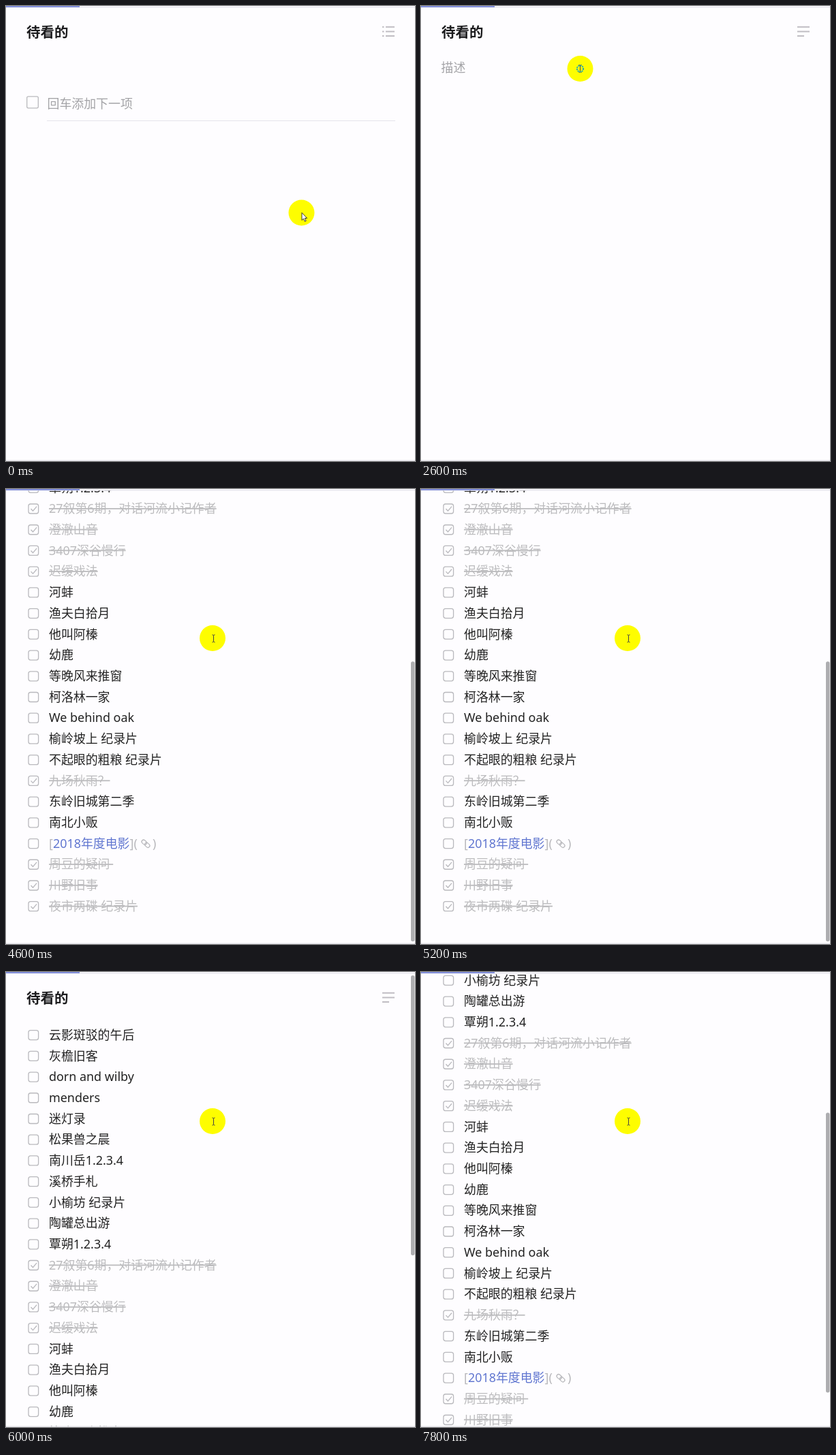
These frames come from a looping animation (600 px wide and 668 px high, 8 s). An HTML page:

```html
<!DOCTYPE html>
<html lang="zh-CN">
<head>
<meta charset="utf-8">
<style>
  html, body { margin: 0; width: 100%; height: 100%; overflow: hidden; background: #fefdff; }
  svg { display: block; font: 17.92px "Noto Sans", "Noto Sans CJK SC", "Noto Sans CJK", sans-serif; fill: #222; }
  .title { font-size: 20.48px; font-weight: bold; fill: #1c1c1e; }
  .hint { fill: #a3a3a6; }
  .done { fill: #bcbcbe; text-decoration: line-through; }
  .soft { fill: #b8b8bc; }
  .link { fill: #6076d0; }
  .box { fill: none; stroke: #b9b9bd; stroke-width: 1.3; }
  .icon { fill: none; stroke: #c0bdc3; stroke-width: 2; }
  .menu { font-size: 10.4px; fill: #111; }
  .menu .latin { font-size: 11.1px; }
  .menu .off { fill: #8c8c8c; }
  .halo { fill: #ff0; mix-blend-mode: multiply; }
  .pointer { fill: #fff; stroke: #222; stroke-width: .9; stroke-linejoin: round; }
  .beam { fill: none; stroke: #444; stroke-width: 1; }
</style>
</head>
<body>
<svg id="stage" width="600" height="668" viewBox="0 0 600 668"></svg>
<script>
const LOOP = 8000, STEP = 200, ROW = 30.72, MAX_SCROLL = 401.5;

// A leading "x" marks a finished item.
const items = `云影斑驳的午后|灰檐旧客|dorn and wilby|menders|迷灯录|松果兽之晨|南川岳1.2.3.4|溪桥手札
|小榆坊 纪录片|陶罐总出游|覃朔1.2.3.4|x27叙第6期，对话河流小记作者|x澄澈山音|x3407深谷慢行|x迟缓戏法|河蚌
|渔夫白拾月|他叫阿榛|幼鹿|等晚风来推窗|柯洛林一家|We behind oak|榆岭坡上 纪录片|不起眼的粗粮 纪录片
|x九场秋雨？|东岭旧城第二季|南北小贩|[2018年度电影]|x周豆的疑问\u00a0|x川野旧事|x夜市两碟 纪录片`.replace(/\n/g, '').split('|');

// label, shortcut (">" opens a submenu), icon shape and colour; "-" is a divider.
const menuRows = [
  ['表情符号', 'Win 键+期间'], '-',
  ['撤消(U)', 'Ctrl+Z'], ['重做(R)', 'Ctrl+Shift+Z', 'off'], '-',
  ['剪切(T)', 'Ctrl+X', 'off'], ['复制(C)', 'Ctrl+C', 'off'], ['粘贴(P)', 'Ctrl+V'],
  ['粘贴为纯文本', 'Ctrl+Shift+V'], ['全选(A)', 'Ctrl+A'], '-',
  ['拼写检查(S)', '>'], ['书写方向', '>'], '-',
  ['屏蔽元素...', '', 'square', '#8b1a20'], ['显示 7Keynooks', '', 'circle', '#3b83c8'],
  ['以 Email 发送页面链接...', '', 'square', '#e2483d'], ['Leafnook Web Clipper', '>', 'circle', '#22a845'],
  ['ZPK Integration Module', '>', 'circle', '#4c9a3c'], ['RowTuk', '>', 'circle', '#2a6fb5'],
  ['Save To Wicket', '', 'square', '#e5485a'], ['Mulo', '>', 'circle', '#f0436f'], '-',
  ['从 Quolli 获取图片说明', '>'], '-',
  ['检查(N)', 'Ctrl+Shift+I']
];

const text = (x, y, str, cls = '', extra = '') => `<text x="${x}" y="${y}" class="${cls}" ${extra}>${str}</text>`;
const rect = (x, y, w, h, attrs) => `<rect x="${x}" y="${y}" width="${w}" height="${h}" ${attrs}/>`;
const path = (d, attrs) => `<path d="${d}" ${attrs}/>`;
const group = (id, body) => `<g id="${id}">${body}</g>`;

function listRow(item, i) {
  const y = 92.3 + i * ROW, done = item[0] === 'x', base = y + 6.5;
  let out = rect(33, y - 6.7, 14.6, 14, 'rx="3" class="box"');
  if (done) out += path(`M36.5 ${y + .3}l3 3.2 5.6-6.6`, 'class="box"');
  if (item[0] !== '[') return out + text(63, base, done ? item.slice(1) : item, done ? 'done' : '');
  const chain = rect(-7, -2.7, 8, 5.4, 'rx="2.7"') + rect(-1, -2.7, 8, 5.4, 'rx="2.7"');
  return out + text(63, base, `[<tspan class="link">${item.slice(1, -1)}</tspan>](`, 'soft') +
    `<g class="box" transform="translate(205 ${y + .5}) rotate(42)">${chain}</g>` + text(215, base, ')', 'soft');
}

function menuMarkup() {
  let y = 105.6;
  let out = rect(237, 95, 237, 454, 'fill="#a8a8aa"') + rect(234.5, 92.5, 238, 455, 'fill="#fefefe" stroke="#a5a5a7"') +
    rect(236, 212.7, 235, 19.6, 'id="hover" fill="#e6e6e8"');
  for (const row of menuRows) {
    if (row === '-') {
      out += path(`M236 ${Math.round(y - 5.1) + .5}H471`, 'stroke="#e6e6e8"');
      y += 9.4;
      continue;
    }
    const [label, key, kind = '', color] = row;
    const cls = str => `${kind === 'off' ? 'off' : ''} ${/^[ -~]+$/.test(str) ? 'latin' : ''}`;
    out += text(262, y + 3.9, label, cls(label));
    if (key === '>') out += path(`M460 ${y - 3.5}l5 3.5-5 3.5z`, 'fill="#555"');
    else out += text(450, y + 3.9, key, cls(key), 'text-anchor="end"');
    if (kind === 'circle') out += `<circle cx="248" cy="${y - .5}" r="5.8" fill="${color}"/>`;
    if (kind === 'square') out += rect(242.5, y - 6, 11, 11, `fill="${color}"`);
    y += 19.6;
  }
  return out;
}

const beam = path('M-2-5.5q2 0 2 1.5V4q0 1.5-2 1.5M2-5.5q-2 0-2 1.5V4q0 1.5 2 1.5', 'class="beam"');
document.getElementById('stage').innerHTML =
  rect(0, 0, 600, 668, 'fill="#fefdff"') +
  group('page',
    text(30, 45.6, '待看的', 'title') +
    path('M552 30.8h18M552 37.6h18M552 44h10', 'id="iconText" class="icon"') +
    path('M552 30.8h2.5m2.5 0h13M552 37.6h2.5m2.5 0h13M552 44h2.5m2.5 0h13', 'id="iconList" class="icon"') +
    group('empty', rect(30.7, 132.8, 16.6, 17, 'rx="2" class="box"') + text(60.5, 149.8, '回车添加下一项', 'hint') +
      path('M60 168.5H571', 'stroke="#e5e4ea"')) +
    group('note', text(29.5, 97, '描述', 'hint')) +
    group('list', items.map(listRow).join(''))) +
  path('M30.5 80V100', 'id="caret" stroke="#222"') +
  rect(0, 0, 600, 1, 'fill="#fefdff"') + rect(0, 1, 600, 1.5, 'fill="#e9e8ef"') + rect(0, 0, 108, 2, 'fill="#8390dc"') +
  rect(0, 666.5, 600, 1.5, 'fill="#eae9ee"') +
  rect(594, 5, 5.5, 411, 'id="thumb" rx="2.7" fill="#adadb0"') +
  group('menu', menuMarkup()) +
  '<circle id="halo" class="halo" r="19"/>' +
  group('cursor',
    group('arrow', path('M.5 0V11L3 8.7 4.8 12.8 6.6 12 4.9 8H8.2Z', 'class="pointer"')) +
    group('hand', path('M-.8 1.2q1.3-1.2 2.3 0V6q1-.8 2 0 1-.6 2 .3 1.400-.4 2 .8v4q0 2-1.200 4H.5Q-1.500 12-3.300 9.500q0-1.600 1.500-.8l1 1z', 'class="pointer"')) +
    group('ibeam', `<g transform="translate(1.5 .5)">${beam}</g>`) +
    group('busy', beam + '<circle r="4.6" fill="none" stroke="#1ba9b5" stroke-width="2" stroke-dasharray="2 1"/>'));
const el = id => document.getElementById(id);
el('menu').setAttribute('class', 'menu');

// Keys are [time, value, ...]; s-curves between keys when eased.
function track(keys, t, eased) {
  let i = keys.findIndex(k => k[0] > t);
  if (i < 0) return keys[keys.length - 1].slice(1);
  const a = keys[i - 1], b = keys[i];
  let p = (t - a[0]) / (b[0] - a[0]);
  if (eased) p = p * p * (3 - 2 * p);
  return a.slice(1).map((v, n) => v + (b[n + 1] - v) * p);
}
const mouse = [[0, 433.5, 303.5], [1000, 558.5, 31], [1200, 558, 38], [1600, 558, 38], [2600, 233.5, 92],
  [2800, 233.5, 92], [3200, 208.8, 198], [4000, 208.8, 198], [4400, 303, 219]];
const scrolling = [[0, 0], [4599, 0], [4600, MAX_SCROLL], [5600, MAX_SCROLL], [6000, 0], [7000, 0], [7800, 326]];

const show = (id, on) => el(id).style.display = on ? '' : 'none';
const place = (id, x, y) => el(id).setAttribute('transform', `translate(${x} ${y})`);

function draw(now) {
  const t = Math.floor(now % LOOP / STEP) * STEP;
  const during = (a, b) => t >= a && t < b;
  const [x, y] = track(mouse, t, true), [scroll] = track(scrolling, t);
  const pasted = t >= 4600;
  place('page', 0, -scroll);
  place('thumb', 0, scroll * .618);
  place('halo', x, y);
  place('cursor', x, y);
  show('empty', t < 1400);
  show('iconList', t < 1400);
  show('iconText', t >= 1400);
  show('note', during(1400, 4600));
  show('list', pasted);
  show('thumb', pasted);
  show('menu', during(2800, 4600));
  show('hover', t === 4400);
  show('caret', during(2800, 3200) || during(3800, 4400));
  const kind = during(1200, 1800) ? 'hand' : t === 2600 ? 'busy' : pasted ? 'ibeam' : 'arrow';
  for (const id of ['arrow', 'hand', 'busy', 'ibeam']) show(id, id === kind);
}

const start = performance.now();
function tick() {
  draw(performance.now() - start);
  requestAnimationFrame(tick);
}
tick();
</script>
</body>
</html>
```
